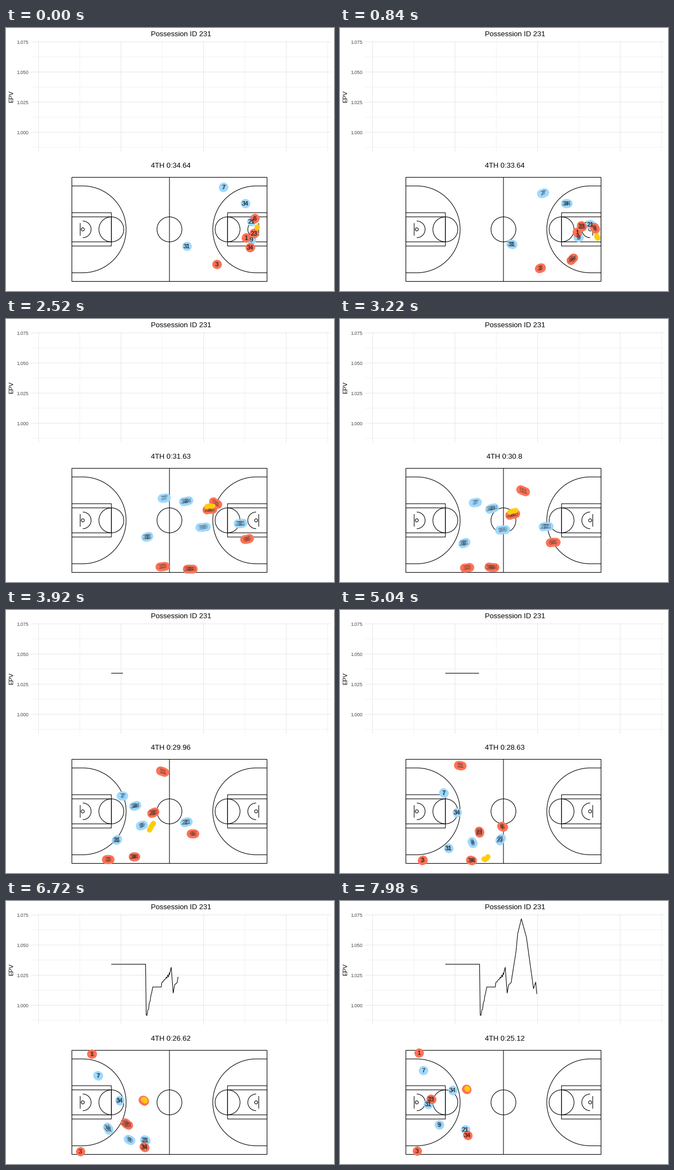
A matplotlib script that plays this animation: 600 px wide and 480 px high, repeating every 8000 ms.

```python
import numpy as np
import matplotlib.pyplot as plt
from matplotlib.animation import FuncAnimation
from matplotlib.patches import Circle, Rectangle

W, H, DPI = 600, 480, 100
PX = 72 / DPI                      # points per pixel
FRAMES, TICK, STEP_MS, STEPS = 200, 40, 140, 57
BLUE, RED, GOLD = "#9fd9ff", "#ff7256", "#ffcc0a"

plt.rcParams["font.family"] = "Liberation Sans"
plt.rcParams["path.snap"] = False
fig = plt.figure(figsize=(W / DPI, H / DPI), dpi=DPI, facecolor="white")
ax = fig.add_axes([0, 0, 1, 1])
ax.set_xlim(0, W)
ax.set_ylim(H, 0)
ax.axis("off")


def label(x, y, s, size, **kw):
    """Text whose capital letters are centred on y."""
    kw = {"ha": "center", "color": "black", **kw}
    return ax.text(x, y + 0.36 * size, s, fontsize=size * PX, va="baseline", **kw)


def stroke(x, y, color="black", width=1.07, z=2):
    return ax.plot(x, y, color=color, lw=width * PX, zorder=z,
                   solid_capstyle="butt", solid_joinstyle="round")[0]


# --- chart -------------------------------------------------------------
def draw_chart():
    for i in range(4):
        y, x = 25.3 + 55 * i, 59.5 + 151 * i
        stroke([46, 594], [y + 27.5] * 2, "#ebebeb", 0.6, 0)
        stroke([x + 75.5] * 2, [24, 226], "#ebebeb", 0.6, 0)
        stroke([46, 594], [y] * 2, "#e8e8e8", 1.07, 0)
        stroke([x] * 2, [24, 226], "#e8e8e8", 1.07, 0)
        label(41, y + 0.3, f"{1.075 - 0.025 * i:.3f}", 8.8, ha="right", color="#4d4d4d")
    label(320, 10.5, "Possession ID 231", 13.2)
    ax.text(13.5, 125, "EPV", fontsize=11 * PX, rotation=90, ha="center",
            va="baseline", rotation_mode="anchor")


# Turning points of the value curve; its two climbs are jagged.
TURNS = np.array([
    (192.5, 115.4), (255.3, 115.4), (256.5, 208.5), (258, 208.5), (268.5, 157), (284, 157),
    (285, 149), (299, 134), (302.2, 121), (305.8, 168), (308.5, 153), (313, 149),
    (322, 92), (325, 60), (331.7, 32.5), (341, 66), (354, 160), (358, 148), (360.3, 173)])
curve_x = np.union1d(TURNS[:, 0], np.arange(258, 300, 1.4))
curve_y = np.interp(curve_x, *TURNS.T)
climbing = ((curve_x > 258) & (curve_x < 268)) | ((curve_x > 286) & (curve_x < 299))
curve_y += climbing * 3 * np.sin(2.1 * curve_x)


# --- court -------------------------------------------------------------
FT, LEFT, TOP, MID = 3.8, 120.5, 272.5, 367.5


def shape(patch):
    patch.set(fill=False, edgecolor="black", linewidth=1.07 * PX, zorder=2)
    ax.add_patch(patch)


def box(x0, y0, x1, y1):
    shape(Rectangle((min(x0, x1), y0), abs(x1 - x0), y1 - y0))


def draw_half(side):
    """side is 1 for the left half and -1 for the right."""
    def at(feet):
        return 299 - side * (299 - LEFT - feet * FT)

    t = np.linspace(-np.pi / 2, np.pi / 2, 90)
    hoop = at(5.25)
    for half in (6, 8):
        box(at(0), MID - half * FT, at(19), MID + half * FT)
    shape(Circle((at(19), MID), 6 * FT))
    shape(Circle((hoop, MID), 0.75 * FT))
    stroke([at(4)] * 2, [MID - 3 * FT, MID + 3 * FT])
    stroke(hoop + side * 4 * FT * np.cos(t), MID + 4 * FT * np.sin(t))
    r = 20.85 * FT
    stroke(np.r_[at(0), hoop + side * r * np.cos(t), at(0)],
           np.r_[MID - r, MID + r * np.sin(t), MID + r])


def draw_court():
    box(LEFT, TOP, 477.5, 462.5)
    stroke([299, 299], [TOP, 462.5])
    shape(Circle((299, MID), 6 * FT))
    draw_half(1)
    draw_half(-1)


# --- motion ------------------------------------------------------------
# Each player runs through five waypoints, evenly spaced in time.
DEFENCE = {
    "7": [(398, 290), (317, 320), (210, 339), (180, 325), (152, 309)],
    "34": [(438, 320), (362, 325), (233, 358), (211, 372), (206, 345)],
    "21": [(449, 353), (455, 369), (326, 388), (273, 440), (229, 417)],
    "9": [(449, 386), (397, 378), (245, 394), (248, 444), (181, 408)],
    "31": [(331, 398), (279, 392), (201, 420), (200, 436), (161, 370)],
}
OFFENCE = {
    "6": [(455, 347), (466, 394), (338, 408), (270, 378), (231, 343)],
    "23": [(454, 375), (406, 345), (266, 371), (250, 424), (166, 361)],
    "1": [(439, 383), (410, 350), (282, 293), (175, 281), (144, 277)],
    "34": [(447, 400), (373, 453), (232, 450), (260, 459), (233, 427)],
    "3": [(386, 431), (319, 449), (183, 455), (138, 457), (141, 456)],
}
names = [*DEFENCE, *OFFENCE]
stops = np.swapaxes([*DEFENCE.values(), *OFFENCE.values()], 0, 1).astype(float)
padded = np.concatenate([stops[:1], stops, stops[-1:]])


def players_at(t):
    """Catmull-Rom position of every player at each time in t."""
    s = np.clip(t / STEPS, 0, 1) * (len(stops) - 1)
    i = np.minimum(s.astype(int), len(stops) - 2)
    u = (s - i)[:, None, None]
    a, b, c, d = (padded[i + k] for k in range(4))
    return b + u / 2 * (c - a + u * (2 * a - 5 * b + 4 * c - d + u * (3 * (b - c) + d - a)))


# Passes: release, catch, receiver, and where the ball sits beside them.
PASSES = [(7, 11, "23", (0, -6)), (25, 33, "34", (25, -2)), (36, 42, "6", (1, -1))]


def beside(spots, name, offset):
    return spots[:, len(DEFENCE) + list(OFFENCE).index(name)] + offset


def ball_at(t, spots):
    pos = beside(spots, "6", (4, 16))
    for release, catch, name, offset in PASSES:
        u = np.clip((t - release) / (catch - release), 0, 1)[:, None]
        pos = pos + u * (beside(spots, name, offset) - pos)
    return pos


# --- animation ---------------------------------------------------------
TRAIL = np.linspace(-0.48, 0.48, 5)  # moments shown together in one step

draw_chart()
draw_court()
clock = label(301, 250.5, "", 13.2)
curve = stroke([], [], z=3)


def dots(color, size, z):
    return ax.plot([], [], "o", color=color, ms=size * PX, mew=0, zorder=z)[0]


blue, red, ball = dots(BLUE, 16, 4), dots(RED, 16, 5), dots(GOLD, 9.5, 7)
tags = [[label(0, 0, n, 11, color="#222222", alpha=0.45, zorder=6) for n in names]
        for _ in TRAIL]


def update(frame):
    n = (frame * TICK + TICK // 2) // STEP_MS
    clock.set_text(f"4TH 0:{round(34.64 - 0.16707 * n, 2)}")

    tip = 214 + 5.034 * (n - 28)
    seen = curve_x < tip
    xs = np.append(curve_x[seen], tip) if seen.any() else []
    curve.set_data(xs, np.interp(xs, curve_x, curve_y))

    times = n + TRAIL
    spots = players_at(times)
    blue.set_data(*spots[:, :len(DEFENCE)].reshape(-1, 2).T)
    red.set_data(*spots[:, len(DEFENCE):].reshape(-1, 2).T)
    ball.set_data(*ball_at(times, spots).T)
    for row, pts in zip(tags, spots):
        for tag, (x, y) in zip(row, pts):
            tag.set_position((x, y + 0.36 * 11))
    return []


anim = FuncAnimation(fig, update, frames=FRAMES, interval=TICK, repeat=True,
                     repeat_delay=0, init_func=lambda: update(0), blit=False)
plt.show()
```
